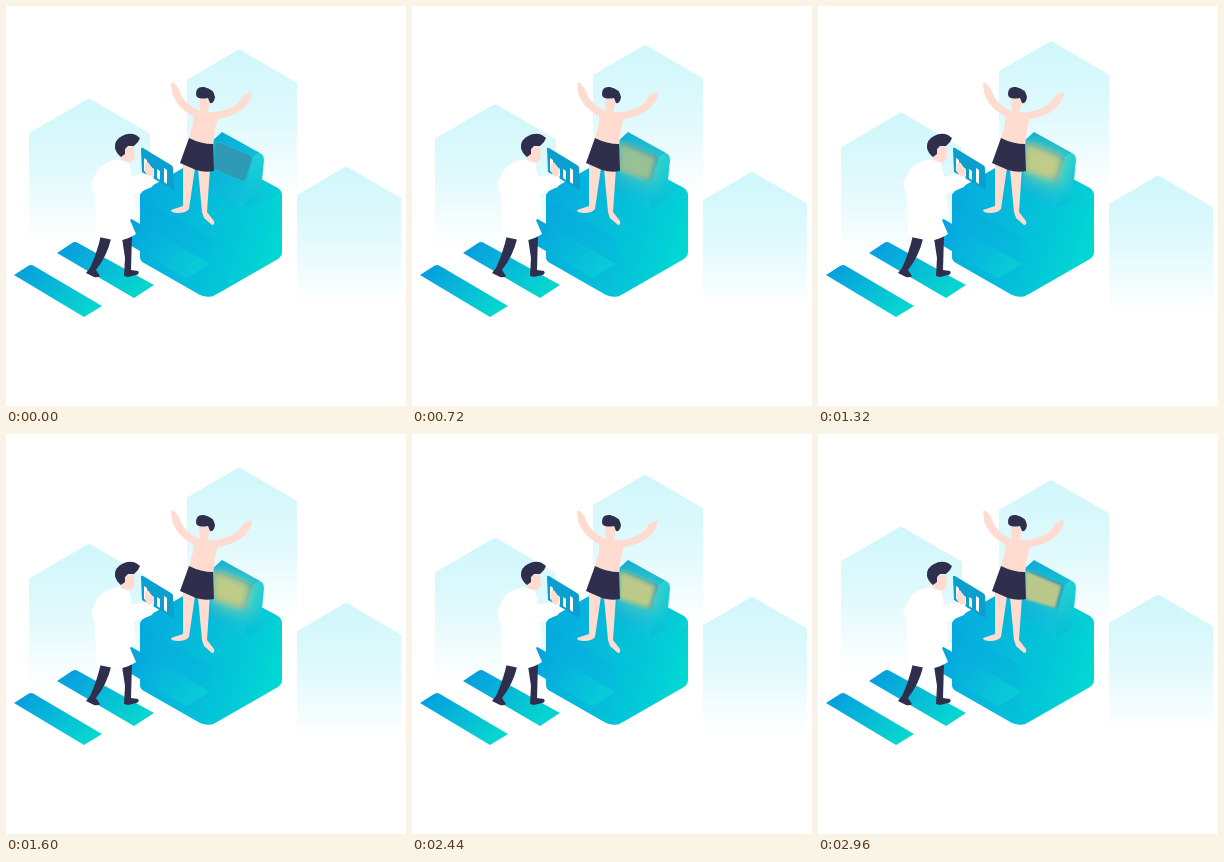
Animation of 400x400 px, one loop 3000 ms. Source, as an HTML page:

```html
<!DOCTYPE html>
<html lang="en">
<head>
<meta charset="utf-8">
<title>Health check</title>
<style>
html, body { margin: 0; width: 100%; height: 100%; overflow: hidden; background: #fff; }
svg { display: block; width: 100%; height: 100%; }
.skin { fill: #ffdccf; }
.dark { fill: #2f2f4d; }
.coat { fill: #fff; }
.limb { fill: none; stroke: #ffdccf; stroke-linecap: round; stroke-linejoin: round; }
</style>
</head>
<body>
<svg viewBox="0 0 400 400">
  <defs>
    <linearGradient id="mist" x1="0" y1="0" x2="0" y2="1">
      <stop offset="0" stop-color="#00d2ea" stop-opacity=".19"/>
      <stop offset=".5" stop-color="#00d2ea" stop-opacity=".12"/>
      <stop offset="1" stop-color="#00d2ea" stop-opacity="0"/>
    </linearGradient>
    <linearGradient id="strip" x1="0" y1="0" x2="1" y2=".6">
      <stop offset="0" stop-color="#0799e0"/><stop offset="1" stop-color="#07d5d0"/>
    </linearGradient>
    <linearGradient id="step" x1="0" y1="0" x2="1" y2=".6">
      <stop offset="0" stop-color="#06a0e0"/><stop offset="1" stop-color="#08cbd8"/>
    </linearGradient>
    <linearGradient id="top" x1="0" y1=".3" x2="1" y2=".5">
      <stop offset="0" stop-color="#05a9de"/><stop offset="1" stop-color="#05cfd6"/>
    </linearGradient>
    <linearGradient id="side" x1="0" y1="0" x2="1" y2=".45">
      <stop offset="0" stop-color="#04b9db"/><stop offset=".55" stop-color="#03c8d8"/><stop offset="1" stop-color="#02d8d2"/>
    </linearGradient>
    <linearGradient id="front" x1="0" y1="0" x2=".8" y2="1">
      <stop offset="0" stop-color="#06a7de"/><stop offset="1" stop-color="#05c1da"/>
    </linearGradient>
    <linearGradient id="tower" x1="0" y1="0" x2="1" y2="1">
      <stop offset="0" stop-color="#07aadb"/><stop offset="1" stop-color="#12cada"/>
    </linearGradient>
    <linearGradient id="edge" x1="0" y1="0" x2="0" y2="1">
      <stop offset="0" stop-color="#1fd0d9"/><stop offset="1" stop-color="#05c0d6"/>
    </linearGradient>
    <filter id="wide" x="-60%" y="-60%" width="220%" height="220%"><feGaussianBlur stdDeviation="8"/></filter>
    <filter id="soft" x="-60%" y="-60%" width="220%" height="220%"><feGaussianBlur id="blur" stdDeviation="2"/></filter>
    <clipPath id="towerClip"><path d="M205 136 216 126 254 147Q258 149 258 154L254 195 238 202 205 185Z"/></clipPath>
  </defs>

  <g id="hexes" fill="url(#mist)"></g>

  <g fill="url(#strip)">
    <path d="M8 269 22 260Q25 258 28 260L96 300 78 311Z"/>
    <path d="M51 247 66 237Q69 235 72 237L148 279 128 292Z"/>
  </g>

  <path fill="url(#front)" d="M134 188 206 230 208 290Q201 292 194 289L138 257Q134 255 134 251Z"/>
  <path fill="url(#side)" d="M204 231 270 192Q276 189 276 185V246Q276 250 272 253L211 288Q206 291 200 290Z"/>
  <path fill="url(#top)" d="M137 185 198 150Q205 146 212 150L272 182Q279 187 272 191L213 229Q206 234 199 229L137 194Q131 190 137 185Z"/>
  <path fill="url(#step)" d="M122 211 204 258 184 270Q180 273 176 270L122 238Z"/>

  <path fill="url(#tower)" d="M205 136 216 126 254 147Q247 150 244 157L238 202 205 185Z"/>
  <path fill="url(#edge)" d="M244 157Q247 149 254 147 258 149 258 154L254 195 238 202Z"/>
  <path fill="#2f9ab6" stroke="#1fb9d0" d="M213 136 244 149Q247 151 246 154L240 173Q239 176 236 175L207 163 209 138Q210 135 213 136Z"/>
  <g clip-path="url(#towerClip)">
    <path id="halo" fill="#b4dc94" filter="url(#wide)" d="M206 132 249 148 243 182 205 172Z"/>
    <path id="glow" fill="#c6cc86" filter="url(#soft)" d="M208 137 243 152 237 174 207 165Z"/>
  </g>

  <path fill="#0a9fce" d="M135 143Q135 141 137 142L165 159Q167 160 167 162L168 184 136 166Z"/>
  <path fill="#fff" d="M138 152 141 154V166L138 165ZM145 161 148 163V171L145 169ZM151 163 154 165V174L151 172ZM158 162 161 164V178L158 176Z"/>

  <g id="doctor">
    <path class="dark" d="M95 229 105 233Q101 250 90 264L94 270Q92 272 88 271L80 267 84 262Q91 247 95 229Z"/>
    <path class="dark" d="M116 232 126 229 125 264 132 265Q134 268 130 269L122 271 118 270 119 252Z"/>
    <path class="coat" d="M113 153Q98 155 91 165L85 178 89 190 90 222Q89 230 93 231L112 235Q123 233 130 228L124 214 130 209 128 188 146 181Q150 174 146 169L137 168 126 171 123 156Z"/>
    <path class="skin" d="M114 143 128 140 129 151Q126 158 121 156L115 154Z"/>
    <path class="dark" d="M109 142Q108 134 116 130 123 126 130 129L134 132 132 136 128 140 122 140 119 143 119 148 115 151Q110 147 109 142Z"/>
    <path class="skin" d="M139 166 139 158Q142 154 144 159L148 164 147 169 143 171Z"/>
  </g>

  <g id="patient">
    <path class="skin" d="M177 157 189 162 183 203Q180 207 172 207 165 207 165 204L177 200Z"/>
    <path class="skin" d="M192 163 204 162 201 206 208 215Q209 219 206 219L198 212 196 206Z"/>
    <path class="limb" stroke-width="7.5" d="M170 86Q174 100 191 108"/>
    <path class="limb" stroke-width="7.5" d="M208 110Q226 108 237 98"/>
    <path class="skin" d="M165 78Q166 75 169 78L173 83 173 91 167 90ZM233 96 238 89 245 86Q247 88 244 94L238 102Z"/>
    <path class="skin" d="M187 104 195 105 211 107Q212 114 209 123L207 141 182 136 187 118Z"/>
    <path class="skin" d="M193 91 204 94 202 105Q198 109 194 105Z"/>
    <path class="dark" d="M190 88Q190 80 198 81 208 83 209 91 208 98 204 97L202 92Q197 93 193 92 190 91 190 88Z"/>
    <path class="dark" d="M183 132Q195 138 207 138L208 165Q199 167 190 164L174 157Z"/>
  </g>
</svg>
<script>
const LOOP = 3000;
const $ = id => document.getElementById(id);

// left edge, apex x, right edge, fade height
const shapes = [[23, 83, 144, 143], [181, 233, 291, 150], [291, 340, 395, 136]];
const hexes = shapes.map(([left, apex, right, height]) => {
  const path = document.createElementNS('http://www.w3.org/2000/svg', 'path');
  const l = left - apex, r = right - apex, slope = 0.57;
  path.setAttribute('d', `M${l} ${-l * slope}L-3 1Q0 -1 3 1L${r} ${r * slope}V${height}H${l}Z`);
  $('hexes').append(path);
  return { path, apex };
});

const swing = (t, from, to, peak) => {
  const k = t < peak ? t / peak : (LOOP - t) / (LOOP - peak);
  return from + (to - from) * (1 - Math.cos(Math.PI * k)) / 2;
};

const track = (t, keys) => {
  const i = Math.max(1, keys.findIndex(([time]) => time >= t));
  const [t0, v0] = keys[i - 1], [t1, v1] = keys[i];
  return v0 + (v1 - v0) * (t - t0) / (t1 - t0);
};

const middleRise = [[0, 44], [1660, 33.6], [LOOP, 46.8]];
const glowLevel = [[0, 0], [1200, 0.95], [LOOP, 0.9]];
const haloLevel = [[0, 0], [1200, 0.6], [2000, 0.6], [LOOP, 0.1]];

function render(t) {
  const tops = [swing(t, 93, 112, 2000), track(t, middleRise), swing(t, 161, 170, 1300)];
  hexes.forEach(({ path, apex }, i) => path.setAttribute('transform', `translate(${apex} ${tops[i]})`));
  $('glow').setAttribute('opacity', track(t, glowLevel));
  $('halo').setAttribute('opacity', track(t, haloLevel));
  $('blur').setAttribute('stdDeviation', swing(t, 1, 3.5, 1700));
}

const start = performance.now();
function tick() {
  render((performance.now() - start) % LOOP);
  requestAnimationFrame(tick);
}
tick();
</script>
</body>
</html>
```
